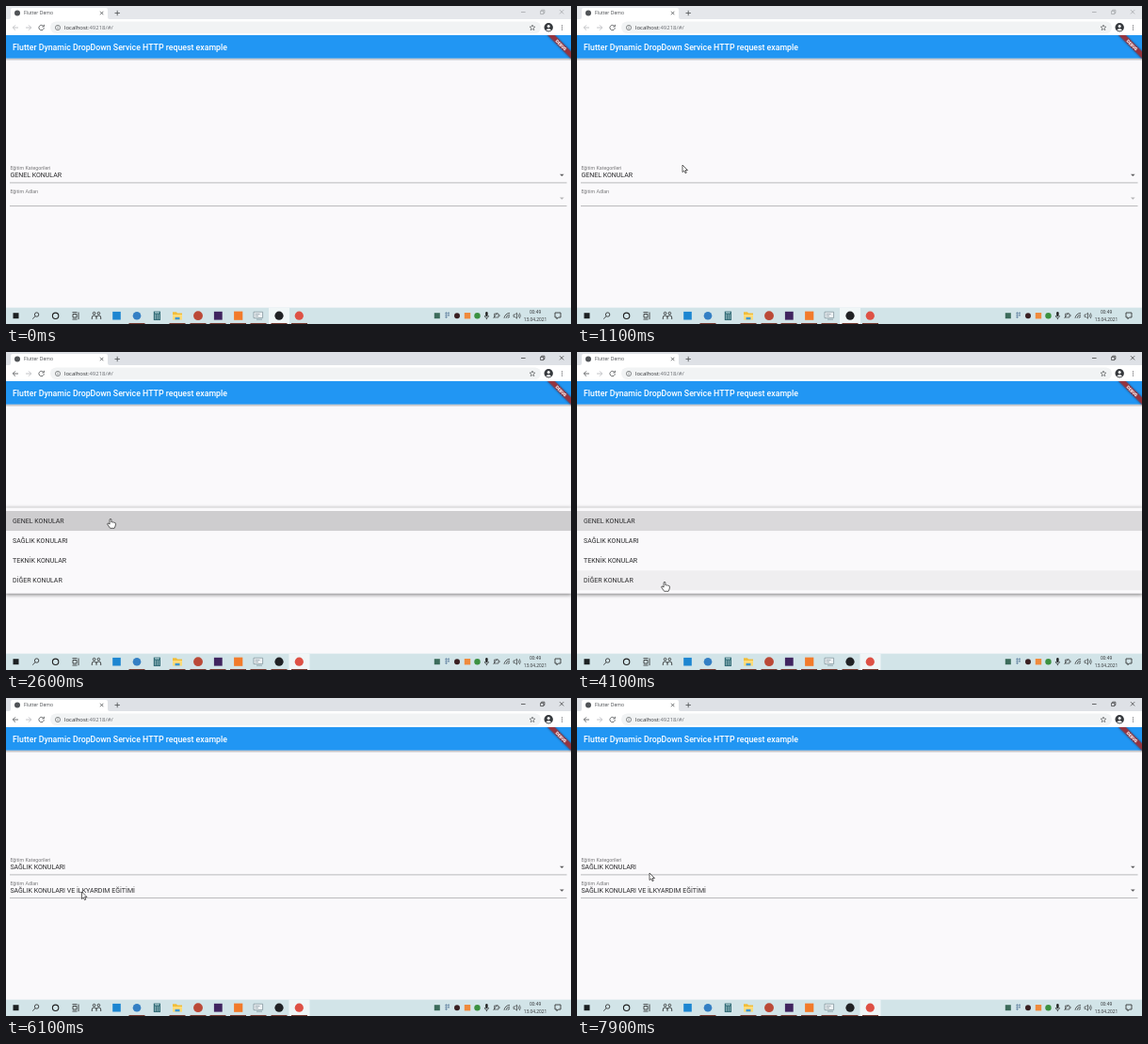
An HTML page that plays this animation: 600x338 px, repeating every 8000 ms.

```html
<!DOCTYPE html>
<html lang="tr">
<head>
<meta charset="utf-8">
<style>
html, body { margin: 0; width: 100%; height: 100%; overflow: hidden; background: #faf9fb; }
svg { display: block; width: 600px; height: 338px; }
text { font: 7.03px Roboto, sans-serif; fill: #2b2b2d; white-space: pre; }
.label { font-size: 5.27px; fill: #777779; }
.ui { font-family: "Open Sans", sans-serif; }
.line { fill: none; stroke: #4b4d50; stroke-width: .8; }
.panel { fill: #faf9fb; filter: drop-shadow(0 1.2px 2.2px rgba(0,0,0,.55)); }
</style>
</head>
<body>
<svg viewBox="0 0 600 338">
  <defs>
    <linearGradient id="fade" x2="0" y2="1">
      <stop stop-color="#000" stop-opacity=".3"/><stop offset="1" stop-color="#000" stop-opacity="0"/>
    </linearGradient>
    <clipPath id="page"><path d="M0 31h600v290H0z"/></clipPath>
  </defs>

  <!-- browser frame -->
  <rect id="strip" width="600" height="14"/>
  <path d="M3 14q2 0 2-2V4q0-2 2-2h99q2 0 2 2v8q0 2 2 2h490v17H0V14z" fill="#fff"/>
  <circle cx="12" cy="7.5" r="3" fill="#505357"/>
  <text class="ui" x="19" y="9.4" style="font-size:5.05px;fill:#45484c">Flutter Demo</text>
  <path class="line" d="M100 5.8l3.4 3.4m0-3.4L100 9.2M115.5 7.5h5.4m-2.7-2.7v5.4"/>
  <rect x="47" y="16.5" width="521" height="12.6" rx="6.3" fill="#f1f3f4"/>
  <g class="line">
    <path id="back" d="M13 23H7.4m2.6-2.7L7.3 23l2.7 2.7"/>
    <path d="M21 23h5.6M24 20.3l2.7 2.7-2.7 2.7" stroke="#b5b7ba"/>
    <path d="M39.6 21.2a2.7 2.7 0 1 0 .7 2M40.4 19.8v2.1h-2.1"/>
    <circle cx="55" cy="23" r="2.6" stroke-width=".6"/>
    <path d="M55 22.6v1.8m0-3.1v.7" stroke-width=".6"/>
    <path d="M559 20l.8 2 2.1.1-1.6 1.4.5 2.1-1.8-1.1-1.8 1.1.5-2.1-1.6-1.4 2.1-.1z" stroke-width=".6"/>
  </g>
  <text class="ui" x="62" y="25.2" style="font-size:5.95px;fill:#292b2f">localhost<tspan fill="#686b70">:49218/#/</tspan></text>
  <circle cx="576.2" cy="22.8" r="4.7" fill="#36393d"/>
  <circle cx="576.2" cy="21.5" r="1.5" fill="#fff"/>
  <path d="M573.4 25.6q2.8-3 5.6 0q-2.8 2-5.6 0" fill="#fff"/>
  <path d="M590.5 20.4v1m0 1.1v1m0 1.1v1" stroke="#4b4d50"/>
  <path id="buttons" d="M547 6.5h4.6M567.6 5.3h3.3v3.3h-3.3zM568.7 5.2V4.2h3.2v3.3h-1M588 4.2l4.2 4.2m0-4.2L588 8.4" fill="none" stroke-width=".65"/>

  <!-- page -->
  <rect y="31" width="600" height="290" fill="#faf9fb"/>
  <rect y="55.5" width="600" height="3" fill="url(#fade)"/>
  <rect y="31" width="600" height="24.6" fill="#2196f3"/>
  <text x="7" y="46.8" style="font-size:8.78px;font-weight:500;fill:#fff">Flutter Dynamic DropDown Service HTTP request example</text>
  <g clip-path="url(#page)">
    <g transform="translate(600 31) rotate(45)">
      <path d="M-18 12.3h36v5.3h-36z" fill="#96343f" style="filter:drop-shadow(0 0 1px rgba(0,0,0,.5))"/>
      <text y="16.5" text-anchor="middle" style="font-size:4.5px;font-weight:900;fill:#fff">DEBUG</text>
    </g>
  </g>
  <text class="label" x="4.4" y="173.7">Eğitim Kategorileri</text>
  <text class="label" x="4.4" y="198.5">Eğitim Adları</text>
  <text id="category" x="4.4" y="182"></text>
  <text id="course" x="4.4" y="206.6"></text>
  <path d="M4 187.9h591.5M4 212.6h591.5" stroke="#8c8c8e" stroke-width=".6"/>
  <path d="M588 178.8h4.6l-2.3 2.3z" fill="#5b5b5d"/>
  <path id="arrow2" d="M588 203.4h4.6l-2.3 2.3z"/>
  <g id="menus" clip-path="url(#page)"></g>

  <!-- taskbar -->
  <rect y="320.6" width="600" height="17.4" fill="#d2e4e8"/>
  <rect id="task" y="320.6" width="22" height="17.4" fill="#f0f6f7"/>
  <g id="icons"></g>
  <g class="line" style="stroke:#222">
    <circle cx="32.6" cy="328" r="2.2"/><path d="M31 329.8l-2.8 2.8"/>
    <circle cx="52.6" cy="329.3" r="3.2" stroke-width="1.1"/>
    <path d="M71 327.5h4v3.6h-4zM70.5 325.6h5M70.5 333h5M77 325.5v7.6"/>
    <circle cx="93.6" cy="326.6" r="1.3"/><circle cx="98.4" cy="326.6" r="1.3"/>
    <path d="M91.3 333v-2q0-2 2.3-2t2.4 2v2m0-2q0-2 2.4-2t2.3 2v2"/>
    <path d="M518.6 327h4.4v4h-4.4zM524 328v2M517.6 332l4-6" stroke-width=".6"/>
    <path d="M529 331.8a6 6 0 0 1 6-5.4M531 331.8a4 4 0 0 1 4-3.4M533 331.8a2 2 0 0 1 2-1.6" stroke-width=".7"/>
    <path d="M539 328h1.5l2-1.8v6l-2-1.8H539zM544 327.5q1.2 1.7 0 3.4M545.3 326.3q2 2.9 0 5.8" stroke-width=".6"/>
    <path d="M583 326h6v5h-2.6l-1.4 1.6V331h-2z"/>
    <path d="M508.3 329q0 2.4 2.1 2.4t2.1-2.4M510.4 331.4v1.8" stroke-width=".7"/>
    <path d="M466 326.5h5M466 328.6h5M466 330.7h3M467.5 325v7M470 325v5" stroke="#58799a" stroke-width=".6"/>
  </g>
  <rect x="509.2" y="325" width="2.4" height="5" rx="1.2" fill="#222"/>
  <path d="M156.8 324.6h7.2v9.4h-7.2z" fill="#2e6873"/>
  <path d="M158 326h4.8M158 328.6h1m1 0h1m1 0h1M158 330.4h1m1 0h1m1 0h1M158 332.2h1m1 0h1m1 0h1" stroke="#d9eff2"/>
  <path d="M177 325.3h4l1 1.2h5v6.8h-10z" fill="#f2bd39"/><path d="M177 328h10v5.3h-10z" fill="#ffdc79"/><path d="M179.5 330.8h5v2.5h-5z" fill="#3c96d4"/>
  <path d="M263 325.2h9.6v6.4H263z" fill="#eef2f4" stroke="#788b94" stroke-width=".7"/><path d="M264.5 327.4h5m-5 2h3.5M266 333.2h6" stroke="#788b94" stroke-width=".7"/>
  <g class="ui" text-anchor="middle">
    <text class="ui" x="562" y="327.2" style="font-size:4.8px">00:49</text>
    <text class="ui" x="562" y="335" style="font-size:4.8px">13.04.2021</text>
  </g>

  <g id="cursor" stroke="#222" stroke-width=".7" stroke-linejoin="round" fill="#fff">
    <path id="pointer" d="M0 0v7.6l1.8-1.6 1.2 2.7 1.3-.6-1.2-2.6h2.4z"/>
    <path id="hand" d="M-.9.9Q0-.6.9.9v3q1-.7 1.7.2 1-.4 1.5.4 1.4-.2 1.4 1.2-.1 2.3-1.4 4.6H-.4Q-2 8-3.4 6q0-1.3 1.4-.9l1.1 1z"/>
  </g>
</svg>
<script>
const $ = id => document.getElementById(id);
const clamp = v => Math.max(0, Math.min(1, v));
const ramp = (t, a, b) => clamp((t - a) / (b - a));
const mix = (a, b, p) => a + (b - a) * p;
const LOOP = 8000, ROW = 21.08, PAD = 3.5;
const FIRST_AID = 'SAĞLIK KONULARI VE İLKYARDIM EĞİTİMİ';

function add(parent, tag, attrs, text = '') {
  const el = document.createElementNS('http://www.w3.org/2000/svg', tag);
  for (const k in attrs) el.setAttribute(k, attrs[k]);
  el.textContent = text;
  return parent.appendChild(el);
}

// Taskbar and tray marks: x, radius, colour, round
[[10.5, 3, '#1c2022', 0], [117.5, 4.3, '#1c86d1', 0], [139, 4.3, '#347fc4', 1],
 [204, 4.9, '#bb4937', 1], [225.3, 4.4, '#40245f', 0], [246.7, 4.6, '#f27a2a', 0],
 [290, 4.6, '#202124', 1], [311.3, 4.6, '#de5145', 1],
 [457.8, 3, '#3c6b5b', 0], [479, 3, '#3a2022', 1], [490, 3.2, '#ef8a3c', 0], [500.5, 3.2, '#3b9140', 1]
].forEach(([x, r, fill, round]) => add($('icons'), 'rect', {
  x: x - r, y: 329.2 - r, width: 2 * r, height: 2 * r, rx: round ? r : 0, fill }));
[139, 182, 204, 225, 246.5, 268, 290, 311.5].forEach(x =>
  add($('icons'), 'rect', { x: x - 8.5, y: 337, width: 17, height: 1, fill: '#74392f' }));

function makeMenu(top, names, open, close, hoverFrom) {
  const g = add($('menus'), 'g', {});
  const panel = add(g, 'rect', { class: 'panel', x: -1, y: top, width: 602, rx: .8 });
  const rows = names.map((name, i) => {
    const row = add(g, 'g', {}), y = top + PAD + i * ROW;
    const bg = add(row, 'rect', { y, width: 600, height: ROW, fill: '#000' });
    add(row, 'text', { x: 7, y: y + 13.1 }, name);
    return { row, bg, y };
  });
  return (t, tipY) => {
    const p = ramp(t, ...open), shown = clamp(p * 4) * (1 - ramp(t, ...close));
    g.setAttribute('opacity', shown);
    g.style.display = shown ? '' : 'none';
    const full = names.length * ROW + 2 * PAD;
    panel.setAttribute('height', mix(ROW + 2 * PAD, full, ramp(p, .25, .5)));
    rows.forEach(({ row, bg, y }, i) => {
      const hover = t >= hoverFrom && tipY >= y && tipY < y + ROW;
      row.setAttribute('opacity', ramp(p, .4 + i * .1, .65 + i * .1));
      bg.setAttribute('opacity', (i ? 0 : .13) + (hover ? .045 : 0));
    });
    return shown > .5;
  };
}

const menus = [
  makeMenu(165.5, ['GENEL KONULAR', 'SAĞLIK KONULARI', 'TEKNİK KONULAR', 'DİĞER KONULAR'],
    [1950, 2250], [5160, 5300], 2550),
  makeMenu(190, [FIRST_AID], [6589, 6590], [7260, 7400], 6590)
];

// Pointer tip: time, x, y
const path = [[300, 300, 338], [1000, 112, 169], [1300, 112, 169], [1800, 111, 177], [3000, 111, 177],
  [3400, 106, 211], [3500, 106, 211], [4100, 93, 244], [4400, 82, 232], [4600, 81, 198],
  [5700, 81, 198], [6100, 80.5, 206], [7300, 80.5, 206], [7900, 77, 186]];

function tip(t) {
  const i = path.findIndex(k => k[0] > t);
  if (i < 0) return path[path.length - 1].slice(1);
  if (!i) return path[0].slice(1);
  const [a, b] = [path[i - 1], path[i]];
  let p = ramp(t, a[0], b[0]);
  p = p * p * (3 - 2 * p);
  return [mix(a[1], b[1], p), mix(a[2], b[2], p)];
}

function draw(t) {
  const active = t >= 1900, loaded = t >= 5200;
  $('strip').setAttribute('fill', active ? '#dee1e6' : '#e5e7eb');
  $('buttons').setAttribute('stroke', active ? '#222' : '#97999c');
  $('back').style.stroke = active ? '#4b4d50' : '#b5b7ba';
  $('task').setAttribute('x', active ? 300.5 : 279);
  $('category').textContent = loaded ? 'SAĞLIK KONULARI' : 'GENEL KONULAR';
  $('course').textContent = loaded ? FIRST_AID : '';
  $('arrow2').setAttribute('fill', loaded ? '#5b5b5d' : '#b4b4b6');

  const [x, y] = tip(t);
  const over = menus.map(m => m(t, y)).some(Boolean);
  $('cursor').setAttribute('transform', `translate(${x} ${y})`);
  $('cursor').style.display = t < path[0][0] ? 'none' : '';
  $('hand').style.display = over ? '' : 'none';
  $('pointer').style.display = over ? 'none' : '';
}

function tick() {
  draw(performance.now() % LOOP);
  requestAnimationFrame(tick);
}
tick();
</script>
</body>
</html>
```
